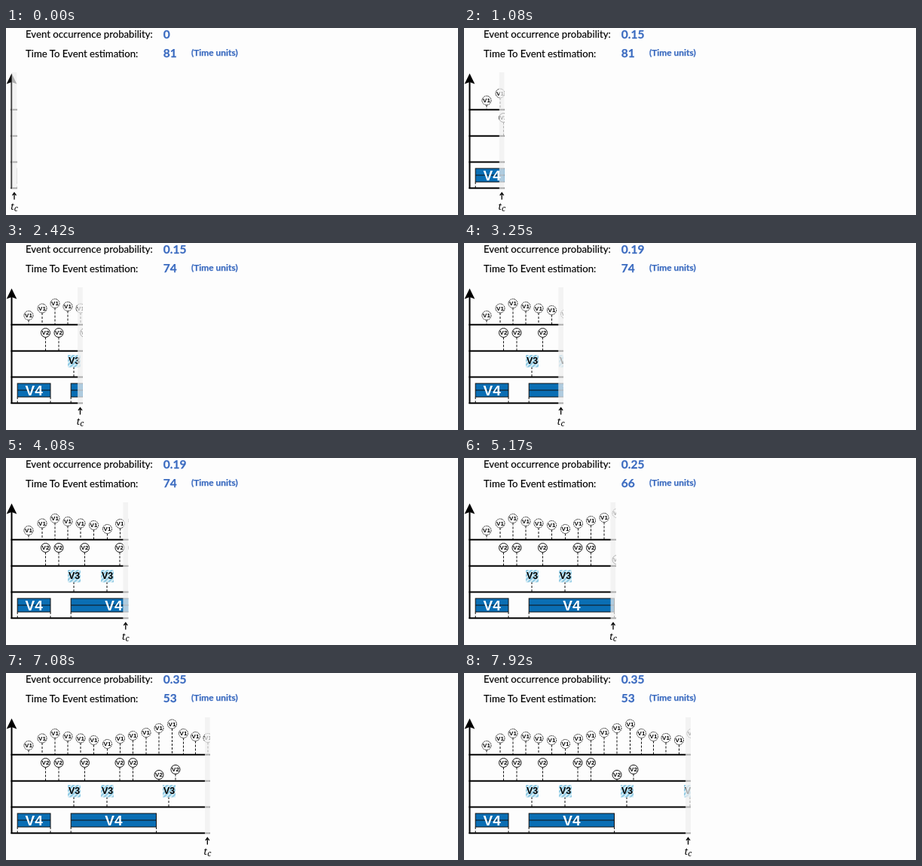
An HTML page for the animation above (8000 ms loop, 600x249 px).

```html
<!DOCTYPE html>
<html lang="en">
<head>
<meta charset="utf-8">
<title>Event prediction timeline</title>
<style>
  html, body { margin: 0; width: 100%; height: 100%; overflow: hidden; background: #fdfdfd; }
  svg { display: block; }
  .label { font: 13.2px Lato, sans-serif; fill: #000; stroke: #000; stroke-width: .15; }
  .value, .unit { fill: #3b6bc0; stroke: #3b6bc0; stroke-width: .25; }
  .value { font: bold 15.5px Lato, sans-serif; }
  .unit { font: bold 11.9px Lato, sans-serif; }
  .tag { font-family: "Liberation Sans", Arial, sans-serif; font-weight: bold; text-anchor: middle; }
  .math { font: italic 13px "Noto Serif", serif; fill: #000; }
  .axis { stroke: #000; stroke-width: 2; }
  .stem { stroke: #111; stroke-width: 1; stroke-dasharray: 3 2; }
</style>
</head>
<body>
<svg id="stage" width="600" height="249" viewBox="0 0 600 249">
  <defs>
    <clipPath id="past"><rect id="reveal" y="59" height="156"/></clipPath>
    <pattern id="hatch" width="4" height="4" patternUnits="userSpaceOnUse" patternTransform="rotate(-45)">
      <rect width="4" height="4" fill="#d9eef6"/>
      <rect width="4" height="2" fill="#8cc8e2"/>
    </pattern>
  </defs>
  <text class="label" x="26" y="13">Event occurrence probability:</text>
  <text class="label" x="26" y="38.5">Time To Event estimation:</text>
  <text class="value" id="probability" x="208.8" y="14"></text>
  <text class="value" id="remaining" x="208.8" y="39"></text>
  <text class="unit" x="246" y="37">(Time units)</text>
  <g clip-path="url(#past)">
    <g id="chart"></g>
    <rect id="band" y="59" width="7" height="156" fill="#f0f0f0" fill-opacity=".72"/>
  </g>
  <g id="cursor">
    <path d="M0 228.5V220M-2.5 222.8L0 219.4L2.5 222.8" fill="none" stroke="#000" stroke-width="1.3"/>
    <text class="math" x="-5" y="242">t<tspan font-size="10.5" dy="2">c</tspan></text>
  </g>
</svg>
<script>
const LOOP = 8000, FRAMES = 96;
const START_X = 11, STEP_X = 3.016, HALF_BAND = 3.4;
const PROBABILITY = [[0, "0"], [500, "0.15"], [2750, "0.19"], [4660, "0.25"], [7000, "0.35"]];
const REMAINING = [[0, "81"], [2080, "74"], [4660, "66"], [7000, "53"]];

const V1 = [[30, 96.5], [48, 87], [65, 80.5], [82, 84.5], [99, 87], [116.5, 89.5], [134.5, 94.5],
  [151.5, 87.5], [168.5, 83.5], [186, 79.5], [203, 73.5], [220.5, 68], [235.5, 80.5],
  [251.5, 84.5], [268, 86.5], [285.5, 89.5], [302, 80.5]];
const V2 = [[52.5, 119.5], [70, 119.5], [104.5, 119.5], [151, 119.5], [168.5, 119.5],
  [203, 135.5], [225, 128.5]];
const V3 = [90.5, 134.5, 216.5, 300.5];
const V4 = [[15.2, 59], [86.2, 199.5]];

const $ = id => document.getElementById(id);
const chart = $("chart");

function add(name, attrs, text = "") {
  const el = document.createElementNS("http://www.w3.org/2000/svg", name);
  for (const key in attrs) el.setAttribute(key, attrs[key]);
  el.textContent = text;
  chart.append(el);
}
const line = (x1, y1, x2, y2, cls) => add("line", { x1, y1, x2, y2, class: cls });
const tag = (text, x, y, size, fill = "#000") =>
  add("text", { x, y, class: "tag", style: `font-size:${size}px;fill:${fill}` }, text);

function pin(text, [x, y], floor, dash) {
  line(x, y + 6, x, floor, "stem");
  add("circle", { cx: x, cy: y, r: 6, fill: "#fff", stroke: "#111", "stroke-width": 1, "stroke-dasharray": dash });
  tag(text, x, y + 2.8, 8);
}

V1.forEach(p => pin("V1", p, 108, "1.6 .8"));
V2.forEach(p => pin("V2", p, 143, "none"));
V3.forEach(x => {
  line(x - .5, 165, x - .5, 178, "stem");
  add("rect", { x: x - 8.5, y: 149, width: 17, height: 16.5, fill: "url(#hatch)" });
  tag("V3", x, 161.3, 12.4);
});
V4.forEach(([left, right]) => {
  line(left, 205, left, 213, "stem");
  line(right, 205, right, 213, "stem");
  add("rect", { x: left, y: 187, width: right - left, height: 18, fill: "#0a6eb4", stroke: "#111" });
  add("path", { d: `M${left} 196H${right}`, stroke: "#111" });
  tag("V4", (left + right) / 2, 202.5, 19, "#fff");
});
[108.8, 143.8, 178.5, 213.2].forEach(y => line(6.5, y, 320, y, "axis"));
line(7.5, 68, 7.5, 214, "axis");
add("path", { d: "M7.5 60.5L14.3 74.5L7.5 72L.7 74.5Z" });

const at = (steps, t) => steps.filter(([from]) => from <= t).pop()[1];

function draw(now) {
  const t = Math.floor((now % LOOP) / 10) * 10;
  const x = START_X + STEP_X * Math.floor((t + 5) * FRAMES / LOOP);
  $("reveal").setAttribute("width", x + HALF_BAND);
  $("band").setAttribute("x", x - HALF_BAND);
  $("cursor").setAttribute("transform", `translate(${x} 0)`);
  $("probability").textContent = at(PROBABILITY, t);
  $("remaining").textContent = at(REMAINING, t);
}

const begin = performance.now();
function tick() {
  draw(performance.now() - begin);
  requestAnimationFrame(tick);
}
tick();
</script>
</body>
</html>
```
